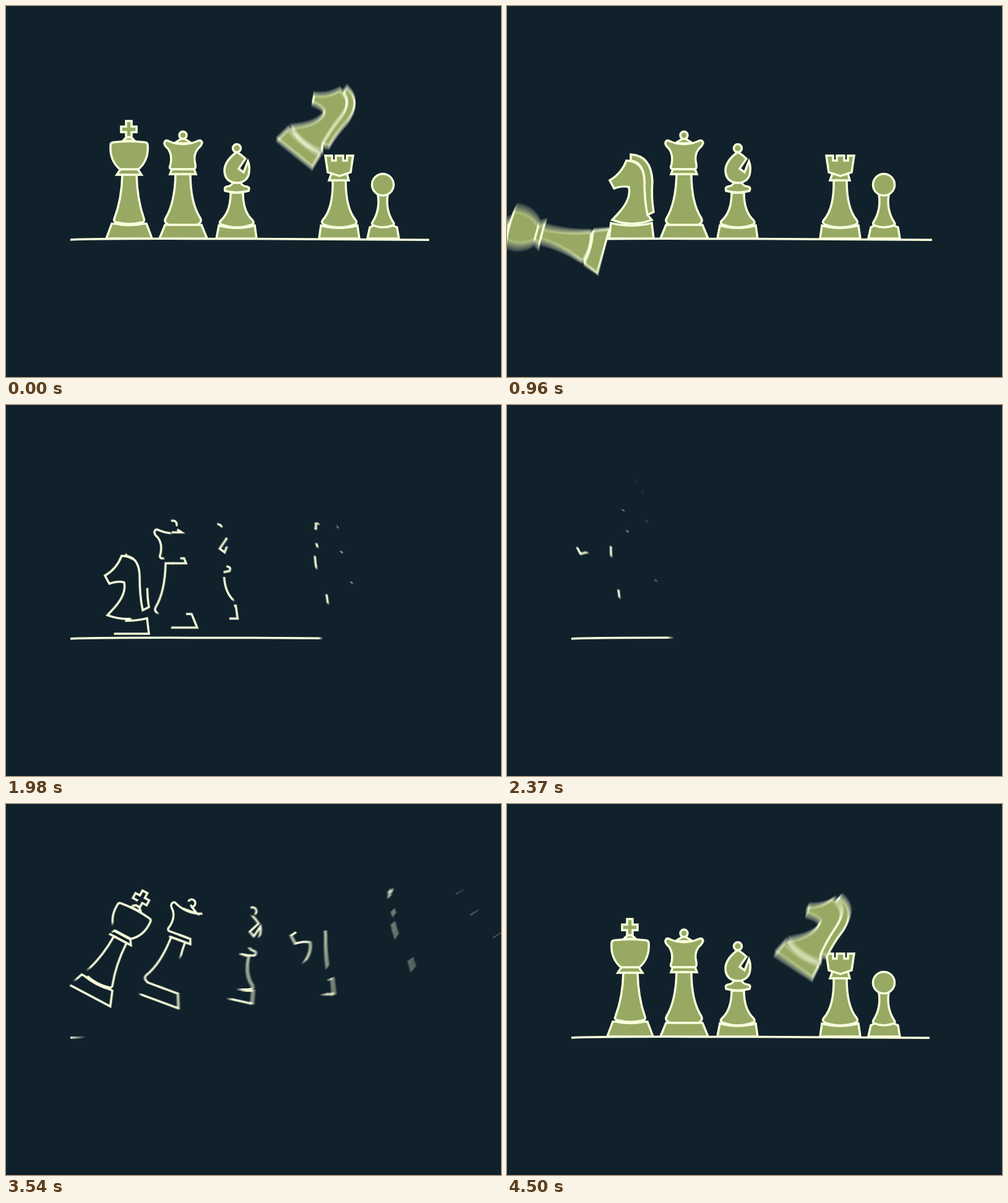
These frames come from a looping animation (800 px wide and 600 px high, 4.53 s). An HTML page with a canvas:

```html
<!DOCTYPE html>
<html lang="en">
<head>
<meta charset="utf-8">
<title>Chess pieces</title>
<style>
html, body { margin: 0; height: 100%; overflow: hidden; background: #11212b; }
canvas { display: block; }
</style>
</head>
<body>
<canvas id="stage" width="800" height="600"></canvas>
<script>
const LOOP = 4530, SHUTTER = 15, SAMPLES = 8;
const BG = '#11212b', FILL = '#97a963', LINE = '#f8ffdc';
const out = document.getElementById('stage').getContext('2d');
const layer = document.createElement('canvas');
layer.width = 800;
layer.height = 600;
const ctx = layer.getContext('2d');

const clamp = v => Math.min(1, Math.max(0, v));
const ball = (x, y, r) => `M${x} ${y + r}a${r} ${r} 0 1 1 0 ${-2 * r}a${r} ${r} 0 1 1 0 ${2 * r}Z`;

// Each outline starts opposite the spot where its line is first drawn.
function outline(d) {
  const el = document.createElementNS('http://www.w3.org/2000/svg', 'path');
  el.setAttribute('d', d);
  return { path: new Path2D(d), len: el.getTotalLength() };
}

const piece = (x, exit, ...shapes) => ({ x, exit, shapes: shapes.map(outline) });

const king = piece(199, Infinity,
  'M189 218Q198 206 208 218Z',
  'M194 212V204H186V195H194V186H203V195H211V204H203V212Z',
  'M185 265Q167 250 169 225Q169 221 173 220.500Q199 217 225 220.500Q229 221 229 225Q231 250 213 265Z',
  'M179 273L185 264H213L219 273Z',
  'M180 350Q173 349 175 344Q187 313 188 273H211Q212 313 223 344Q225 349 219 350Q199 355 180 350Z',
  'M162 376L171 352H176Q199 357 222 352H227L236 376Z');
const queen = piece(286, 1662,
  'M272 222L286 213L300 222Z',
  ball(286, 209, 6),
  'M317 221Q316 226 310 231Q302 241 306 256Q307 262 304 264H267Q263 262 266 256Q269 241 262 231Q255 225 256 221Q258 215 264 219Q286 228 308 219Q315 215 317 221Z',
  'M265 272L268 264H304L307 272Z',
  'M308 354Q318 350 314 343Q298 318 298 272H274Q273 318 258 343Q254 350 264 354Z',
  'M248 376L257 354H316L325 376Z');
const bishop = piece(373, 1540,
  'M373 286Q353 285 353 265Q354 250 373 236Q381 241 387 247L376 263L384 269L391 251Q394 258 393 267Q392 285 373 286Z',
  ball(373, 230, 6.5),
  'M354 299Q352 293 357 292Q365 291 366 286H380Q381 291 389 292Q395 293 392 299Q373 304 354 299Z',
  'M350 354Q342 352 348 346Q363 332 363 302H383Q383 332 398 346Q403 352 396 354Q373 362 350 354Z',
  'M340 376L344 355Q373 363 402 355L405 376Z');
const knight = piece(201, 1785,
  'M235 283Q233 242 200 240V250Q221 253 222 282Q222 315 227 338L237 333Q233 310 235 283Z',
  'M234 346L227 338Q222 315 222 282Q221 251 193 250Q185 271 166 282L173 295Q188 290 197 293Q201 311 182 333L170 346Q202 358 234 346Z',
  'M165 376L168 351Q202 359 234 351L237 376Z');
const rook = piece(538.5, 1417,
  'M522 282L526 271H551L554 282Z',
  'M520 269L516 242H527V250H533V242H545V250H551V242H561L557 269L539 275Z',
  'M515 354Q508 351 512 346Q529 327 528 282H549Q549 327 565 346Q569 351 563 354Q538 362 515 354Z',
  'M506 376L509 355Q538 363 568 355L571 376Z');
const pawn = piece(609, 1295,
  'M596 356Q590 354 592 350Q605 330 601 305H617Q613 330 626 350Q629 354 622 356Q609 360 596 356Z',
  ball(609, 289, 17.5),
  'M584 376L588 358L594 355Q609 361 625 355L632 358L635 376Z');
const pieces = [king, queen, bishop, knight, rook, pawn];

// Keys: time, x, y, degrees
const ARRIVE = [
  [-20, 290, -240, -38], [0, 232, -190, -35], [30, 185, -148, -30], [120, 95, -105, -10],
  [210, 43, -70, 0], [300, -4, -60, 12], [390, -43, -59, 20], [480, -63, -66, 28],
  [560, -70, -58, 27], [720, -40, -25, 13], [880, -7, -4, 2], [1000, 0, 0, 0]
];
const LEAP = [
  [-210, 455, 376, 0], [-120, 458, 335, 15], [-30, 463, 263, 34], [0, 466.5, 239, 39],
  [150, 440, 158, 20], [260, 360, 155, -35], [370, 295, 160, -68], [460, 290, 165, -55],
  [540, 301, 163, -30], [610, 297, 160, -22], [720, 225, 300, -14], [780, 201, 376, 2],
  [840, 201, 376, -3], [920, 201, 376, 0]
];
const TOPPLE = [
  [690, 0, 0, 0], [760, -25, -5, -14], [900, -40, 5, -56], [1080, -50, 82, -110], [1300, -110, 340, -165]
];

// Monotone cubic through the keys
function spline(keys, t) {
  const last = keys.length - 1;
  if (t <= keys[0][0]) return keys[0].slice(1);
  if (t >= keys[last][0]) return keys[last].slice(1);
  const i = keys.findIndex(k => k[0] > t) - 1;
  const h = keys[i + 1][0] - keys[i][0], p = (t - keys[i][0]) / h;
  return [1, 2, 3].map(c => {
    const slope = j => (keys[j + 1][c] - keys[j][c]) / (keys[j + 1][0] - keys[j][0]);
    const tangent = j => {
      if (j === 0 || j === last) return slope(j ? last - 1 : 0);
      const a = slope(j - 1), b = slope(j);
      return a * b > 0 ? 2 * a * b / (a + b) : 0;
    };
    const a = keys[i][c], b = keys[i + 1][c];
    return a + (b - a) * p * p * (3 - 2 * p)
      + h * p * (1 - p) * ((1 - p) * tangent(i) - p * tangent(i + 1));
  });
}

function drawShape({ path, len }, hidden, alpha) {
  if (alpha > 0) {
    ctx.globalAlpha = alpha;
    ctx.fill(path);
    ctx.globalAlpha = 1;
  }
  if (hidden > 0) {
    const from = .5 * (1 - (1 - hidden) ** 3);
    const to = 1 - .5 * hidden * hidden * (3 - 2 * hidden);
    ctx.setLineDash([(to - from) * len, 2 * len]);
    ctx.lineDashOffset = -from * len;
  } else {
    ctx.setLineDash([]);
  }
  ctx.stroke(path);
}

function drawPiece(p, i, t) {
  const age = t + 1470 - 88 * i, gone = Math.max(0, t - p.exit);
  const hidden = gone ? clamp(gone / 760) : clamp(1 - (age + 15) / 520);
  if (hidden >= 1) return;
  const alpha = gone ? clamp(1 - gone / 110) : clamp((age - 560) / 140);
  let [x, y, turn] = spline(ARRIVE, age);
  const [mx, my, mr] = p === knight ? spline(LEAP, t)
    : p === king ? spline(TOPPLE, t).map((v, c) => v + [p.x, 376, 0][c])
    : [p.x, 376, 0];
  const drift = (.01255 * gone) ** 2;
  ctx.save();
  ctx.translate(x + mx - drift, y + my - drift);
  ctx.rotate((turn + mr) * Math.PI / 180);
  ctx.translate(-p.x, -376);
  for (const s of p.shapes) drawShape(s, hidden, alpha);
  ctx.restore();
}

function drawGround(t) {
  const shown = t < 1170
    ? 1 - (1 - clamp((t + 995) / 1535)) ** 5
    : 1 - clamp((t - 1170) / 1390) ** 2.2;
  if (shown <= 0) return;
  ctx.save();
  ctx.beginPath();
  ctx.rect(100, 360, 4 + 583 * shown, 30);
  ctx.clip();
  ctx.setLineDash([]);
  ctx.beginPath();
  ctx.moveTo(104, 378);
  ctx.bezierCurveTo(150, 375.5, 250, 376.5, 400, 376.5);
  ctx.lineTo(690, 378.3);
  ctx.stroke();
  ctx.restore();
}

function drawScene(ms) {
  // Arrival comes before time zero, so the loop's tail counts as negative.
  const t = ms > 2700 ? ms - LOOP : ms;
  ctx.fillStyle = BG;
  ctx.fillRect(0, 0, 800, 600);
  ctx.fillStyle = FILL;
  ctx.strokeStyle = LINE;
  ctx.lineWidth = 3.5;
  drawGround(t);
  pieces.forEach((p, i) => { if (p !== knight) drawPiece(p, i, t); });
  drawPiece(knight, 3, t);
}

const start = performance.now();
function frame() {
  const now = performance.now() - start;
  // Running average of sub-frames gives motion blur.
  for (let i = 0; i < SAMPLES; i++) {
    const ms = now + ((i + .5) / SAMPLES - .5) * SHUTTER;
    drawScene((ms + LOOP) % LOOP);
    out.globalAlpha = 1 / (i + 1);
    out.drawImage(layer, 0, 0);
  }
  requestAnimationFrame(frame);
}
frame();
</script>
</body>
</html>
```
